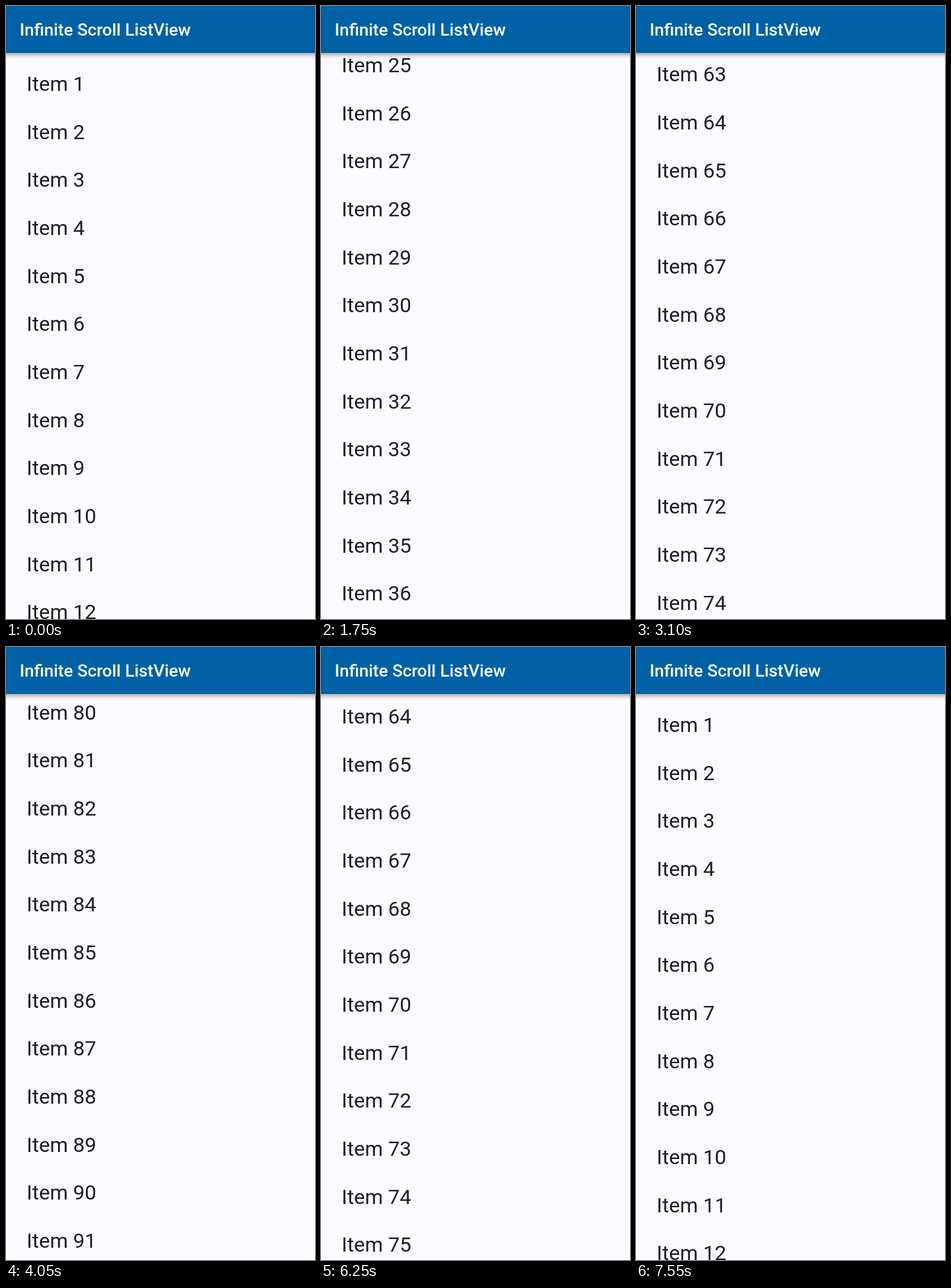
Recreate the animation shown at these times as an HTML page with a canvas. Size 480 by 953 pixels, loop 8 s.

```html
<!DOCTYPE html>
<html lang="en">
<head>
<meta charset="utf-8">
<title>Infinite Scroll ListView</title>
<style>
html, body { margin: 0; width: 100%; height: 100%; overflow: hidden; background: #fdfbff; }
canvas { display: block; width: 480px; height: 953px; }
</style>
</head>
<body>
<canvas id="stage" width="480" height="953"></canvas>
<script>
const W = 480, H = 953, BAR = 73, LOOP = 8000, STEP = 50;
const PITCH = 224 / 3, COUNT = 100, FIRST = 132;
const INK = '#1f1d22';
const ctx = document.getElementById('stage').getContext('2d');

const easeOut = p => u => 1 - Math.pow(1 - u, p);
const easeIn = p => u => Math.pow(u, p);

// Swipes: start, end, scroll from, scroll to, easing
const swipes = [
  [0, 670, 0, 750, easeOut(1.5)],
  [870, 1700, 750, 1790, easeOut(2.7)],
  [1700, 1870, 1790, 2243, easeIn(2.19)],
  [2700, 3550, 2243, 5228, easeOut(2.565)],
  [3900, 4320, 5228, 6724, easeOut(1.4)],
  [5950, 6950, 6724, 0, easeOut(0.994)]
];

// Overscroll glows at either end of the list
const glows = [
  { hit: 670, size: 0.155 },
  { hit: 1870, size: 0.5 },
  { hit: 4320, size: 0.8, hold: 4800, release: 6000 },
  { hit: 6950, size: 0.8, top: true, end: 7550 }
];
const IMPACT = 165, RECEDE = 600, GLOW_ALPHA = 0.3;

function scrollAt(t) {
  let s = 0;
  for (const [t0, t1, from, to, ease] of swipes) {
    if (t < t0) break;
    s = from + (to - from) * ease(Math.min(1, (t - t0) / (t1 - t0)));
  }
  return s;
}

function glowLevel(g, t) {
  if (t < g.hit || t >= g.end) return 0;
  let fade = 1;
  if (g.hold && t > g.hold) {
    fade = Math.max(0, 1 - Math.max(0, t - g.release + STEP) / 200);
    t = g.hold;
  }
  const age = t - g.hit;
  if (age < IMPACT) return age / IMPACT;
  const left = Math.max(0, 1 - (age - IMPACT) / RECEDE);
  return left * left * fade;
}

function drawGlow(g, t) {
  const level = glowLevel(g, t);
  if (level <= 0) return;
  const radius = W * 1.5, depth = W * 0.201;
  ctx.save();
  ctx.translate(W / 2, g.top ? BAR : H);
  ctx.scale(1, (g.top ? 1 : -1) * g.size * level);
  ctx.beginPath();
  ctx.arc(0, depth - radius, radius, 0, Math.PI * 2);
  ctx.fillStyle = `rgba(83, 90, 102, ${GLOW_ALPHA * level})`;
  ctx.fill();
  ctx.restore();
}

function label(text, x, y, weight, size, color, align = 'left') {
  ctx.font = `${weight} ${size}px Roboto, sans-serif`;
  ctx.fillStyle = color;
  ctx.textAlign = align;
  ctx.fillText(text, x, y);
}

function drawList(scroll) {
  const top = FIRST - scroll;
  for (let i = 0; i < COUNT; i++) {
    const y = top + i * PITCH;
    if (y > BAR - 20 && y < H + 40) label('Item ' + (i + 1), 32, y, 400, 32, INK);
  }
  const y = top + (COUNT - 1) * PITCH + 94.5;
  if (y < H + 40) label('No more data to load', W / 2, y, 700, 26.67, INK, 'center');
}

function drawBar() {
  ctx.save();
  ctx.shadowColor = 'rgba(0, 0, 0, 0.38)';
  ctx.shadowBlur = 7;
  ctx.shadowOffsetY = 3;
  ctx.fillStyle = '#0061a6';
  ctx.fillRect(-20, -20, W + 40, BAR + 20);
  ctx.restore();
  label('Infinite Scroll ListView', 21.3, 46, 500, 26.67, '#fff');
}

function draw(now) {
  const t = Math.floor((now % LOOP) / STEP) * STEP;
  ctx.fillStyle = '#fdfbff';
  ctx.fillRect(0, 0, W, H);
  drawList(scrollAt(t));
  glows.forEach(g => drawGlow(g, t));
  drawBar();
}

const start = performance.now();
function tick() {
  draw(performance.now() - start);
  requestAnimationFrame(tick);
}
tick();
</script>
</body>
</html>
```
